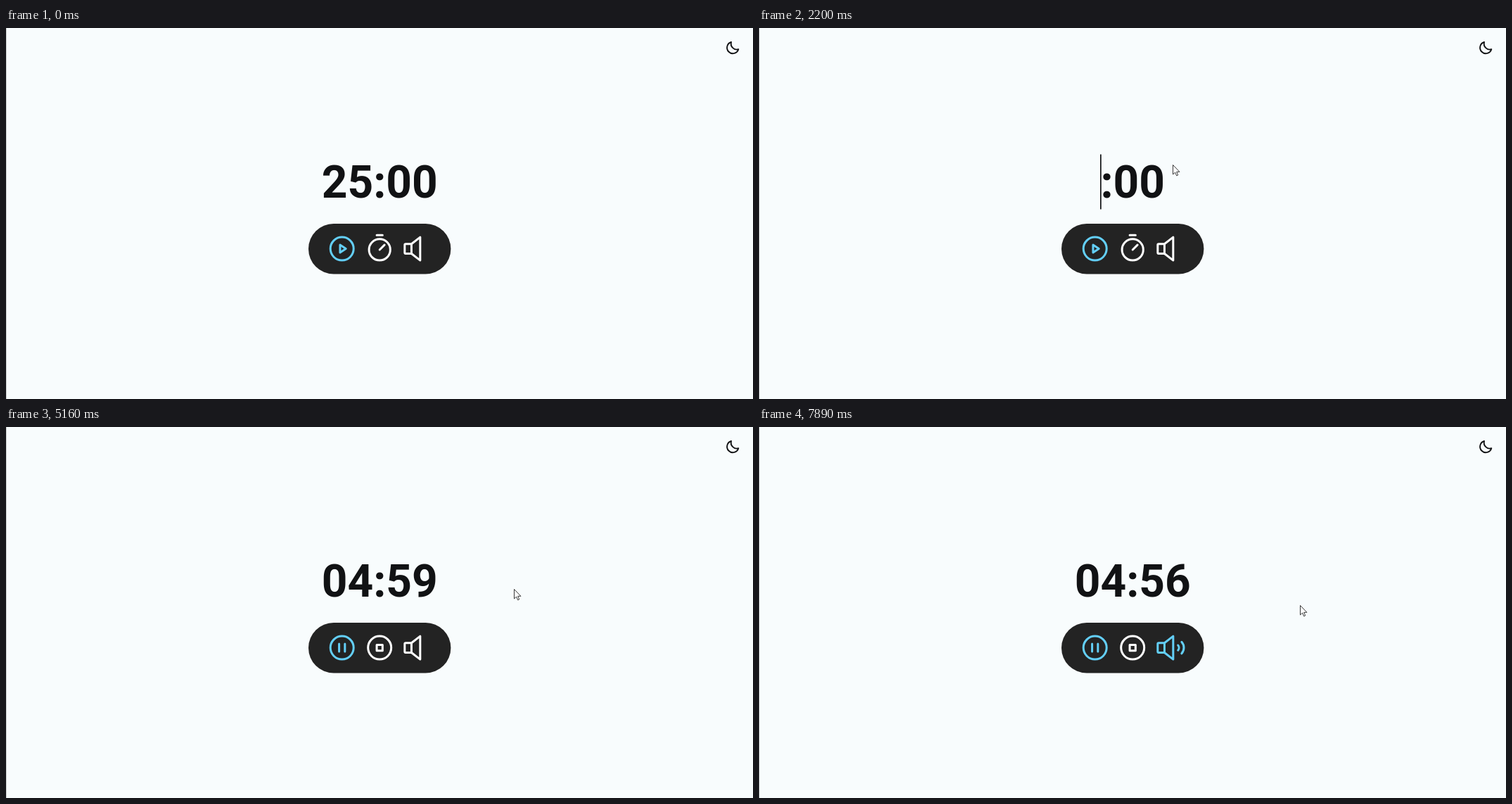
Write an HTML page with a canvas that moves like this. It is 1062 px wide and 527 px high and loops after 8000 ms.

```html
<!DOCTYPE html>
<html lang="en">
<head>
<meta charset="utf-8">
<title>Focus timer</title>
<style>
  html, body { margin: 0; width: 100%; height: 100%; overflow: hidden; background: #f8fcfd; }
  canvas { display: block; width: 1062px; height: 527px; }
</style>
</head>
<body>
<canvas id="stage" width="1062" height="527"></canvas>
<script>
const ctx = document.getElementById('stage').getContext('2d');
const LOOP = 8000, STEP = 70, SECOND = 1020;
const PAPER = '#f8fcfd', INK = '#111214', PILL = '#232323', BLUE = '#63cff7', WHITE = '#ffffff';
const CENTER = { x: 531.2, y: 313.6 }, PITCH = 53.5, ICON_SIZE = 44;

// Clicks and key presses
const CLEAR_AT = 1590, TYPE_AT = 2740, BLUR_AT = 3350, PLAY_AT = 4820, SOUND_AT = 7480;

// Each pointer move eases from the previous stop to the next one
const ENTRY = { x: 946, y: 497 };
const MOVES = [
  { from: 120, to: 860, x: 538, y: 311 },
  { from: 890, to: 1100, x: 533, y: 264 },
  { from: 1100, to: 1300, x: 540, y: 296 },
  { from: 1540, to: 2250, x: 590, y: 190 },
  { from: 2690, to: 3280, x: 711, y: 187 },
  { from: 3810, to: 4490, x: 476, y: 299 },
  { from: 4760, to: 5150, x: 722, y: 230 },
  { from: 6100, to: 6660, x: 585, y: 308 },
  { from: 7420, to: 7750, x: 769, y: 253 }
];

const ICONS = {
  ring: 'M224 128a96 96 0 1 1-192 0a96 96 0 1 1 192 0z',
  play: 'M160 128L112 96V160Z',
  pause: 'M104 96V160M152 96V160',
  stop: 'M104 104H152V152H104Z',
  timer: 'M216 136a88 88 0 1 1-176 0a88 88 0 1 1 176 0zM128 136L168 96M104 16H152',
  speaker: 'M80 168H32a8 8 0 0 1-8-8V96a8 8 0 0 1 8-8H80L152 32V224ZM80 88V168',
  waves: 'M192 107a32 32 0 0 1 0 42M222 80a72 72 0 0 1 0 96',
  moon: 'M217 153A92 92 0 0 1 103 39A92 92 0 1 0 217 153Z'
};
for (const name in ICONS) ICONS[name] = new Path2D(ICONS[name]);

const ARROW = new Path2D('M0 0V13.4L3.1 10.6L5.2 15.3L7.2 14.4L5.2 9.8H9.4Z');
const HAND = new Path2D('M-1.7 10.5V1.2a1.6 1.6 0 0 1 3.2 0V5.6q1.6-.5 2.5.7q1.6-.4 2.4.9' +
  'q1.8-.2 1.8 1.6V12.5q0 2-1.5 4V18.7H-1.7V17L-5.5 11.9c-.8-1.2 .3-2.6 1.7-1.8Z');
const KNUCKLES = new Path2D('M1.5 5.6V9.4M4 6.5V9.6M6.4 7.5V9.9');

function drawIcon(names, x, y, size, color, lineWidth) {
  const scale = size / 256;
  ctx.save();
  ctx.translate(x - size / 2, y - size / 2);
  ctx.scale(scale, scale);
  ctx.strokeStyle = color;
  ctx.lineWidth = lineWidth / scale;
  ctx.lineCap = ctx.lineJoin = 'round';
  names.forEach(name => ctx.stroke(ICONS[name]));
  ctx.restore();
}

function roundRect(x, y, w, h, r) {
  ctx.beginPath();
  ctx.roundRect(x, y, w, h, r);
}

function minutesAndSeconds(t) {
  if (t < CLEAR_AT) return ['25', '00'];
  if (t < TYPE_AT) return ['', '00'];
  if (t < BLUR_AT) return ['5', '00'];
  const elapsed = t < PLAY_AT ? 0 : 1 + Math.floor((t - PLAY_AT) / SECOND);
  const left = 5 * 60 - elapsed;
  return [Math.floor(left / 60), left % 60].map(n => String(n).padStart(2, '0'));
}

function drawClock(t) {
  const [minutes, seconds] = minutesAndSeconds(t);
  const label = minutes + ':' + seconds;
  ctx.font = 'bold 64px Roboto, sans-serif';
  ctx.fillStyle = INK;
  const left = CENTER.x - ctx.measureText(label).width / 2;
  ctx.fillText(label, left, 241);

  if (t < CLEAR_AT || t >= BLUR_AT) return;
  const width = ctx.measureText(minutes).width;
  ctx.strokeStyle = INK;
  ctx.lineWidth = 1.5;
  roundRect(left + 0.3, 180.3, width + 0.2, 76.4, width ? 2 : 0);
  ctx.stroke();
}

function drawControls(t) {
  const running = t >= PLAY_AT, sound = t >= SOUND_AT;
  const put = (slot, names, color) =>
    drawIcon(names, CENTER.x + slot * PITCH, CENTER.y, ICON_SIZE, color, 3);
  ctx.fillStyle = PILL;
  roundRect(430, 278, 202.4, 71.6, 35.8);
  ctx.fill();
  put(-1, ['ring', running ? 'pause' : 'play'], BLUE);
  put(0, running ? ['ring', 'stop'] : ['timer'], WHITE);
  put(1, sound ? ['speaker', 'waves'] : ['speaker'], sound ? BLUE : WHITE);
}

function pointerAt(t) {
  let spot = ENTRY;
  for (const move of MOVES) {
    if (t < move.from) break;
    const held = Math.floor((t - move.from) / STEP) * STEP;
    const u = t >= move.to ? 1 : held / (move.to - move.from);
    const k = u * u * (3 - 2 * u);
    spot = { x: spot.x + (move.x - spot.x) * k, y: spot.y + (move.y - spot.y) * k };
  }
  return spot;
}

function isOnButton({ x, y }) {
  const half = ICON_SIZE / 2, slot = Math.round((x - CENTER.x) / PITCH);
  return Math.abs(slot) <= 1 && Math.abs(y - CENTER.y) < half &&
    Math.abs(x - CENTER.x - slot * PITCH) < half;
}

function drawPointer(t) {
  if (t < MOVES[0].from) return;
  const spot = pointerAt(t);
  ctx.save();
  ctx.translate(Math.round(spot.x) + 0.5, Math.round(spot.y) + 0.5);
  ctx.fillStyle = WHITE;
  if (isOnButton(spot)) {
    ctx.strokeStyle = PILL;
    ctx.stroke(HAND);
    ctx.fill(HAND);
    ctx.lineWidth = 0.7;
    ctx.stroke(KNUCKLES);
  } else {
    ctx.strokeStyle = '#222222';
    ctx.lineWidth = 0.9;
    ctx.fill(ARROW);
    ctx.stroke(ARROW);
  }
  ctx.restore();
}

function draw(t) {
  ctx.fillStyle = PAPER;
  ctx.fillRect(0, 0, 1062, 527);
  ctx.fillStyle = '#c9cccd';
  ctx.fillRect(0, 0, 1, 527);
  drawIcon(['moon'], 1033.3, 28, 23, INK, 1.9);
  drawClock(t);
  drawControls(t);
  drawPointer(t);
}

const begin = performance.now();
function tick() {
  draw((performance.now() - begin) % LOOP);
  requestAnimationFrame(tick);
}
tick();
</script>
</body>
</html>
```
